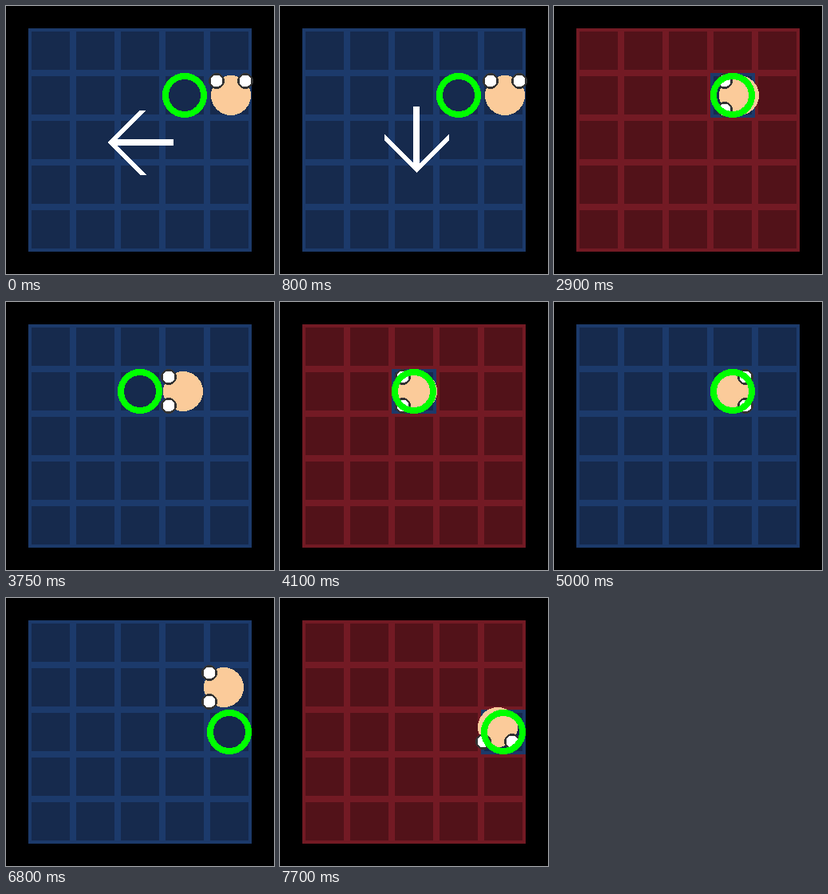
An HTML page for the animation above (8 s loop, 336 px wide and 336 px high).

```html
<!DOCTYPE html>
<html lang="en">
<head>
<meta charset="utf-8">
<title>Grid memory game</title>
<style>
html, body { margin: 0; width: 100%; height: 100%; overflow: hidden; background: #000; }
svg { display: block; width: 336px; height: 336px; shape-rendering: crispEdges; }
.cell { fill: #162a4d; stroke: #1c3a6b; stroke-width: 4; }
.cell.miss { fill: #521219; stroke: #731a24; }
.ring { fill: none; stroke-width: 8; }
.eye { fill: #fff; stroke: #333; stroke-width: 2.5; }
</style>
</head>
<body>
<svg viewBox="0 0 336 336">
  <g id="grid"></g>
  <g id="player">
    <circle r="25" fill="#fbcb9a"/>
    <circle class="eye" cx="18" cy="-18" r="8.75"/>
    <circle class="eye" cx="18" cy="18" r="8.75"/>
  </g>
  <circle id="goal" class="ring" r="24" stroke="#0f0"/>
  <path id="arrow" fill="#fff" d="M127 171l40-40h8l-36 36h71v8h-71l37 37h-8z"/>
  <circle id="stay" class="ring" cx="164" cy="164" r="36" stroke="#fff"/>
</svg>
<script>
const [grid, player, goal, arrow, stay] =
  ['grid', 'player', 'goal', 'arrow', 'stay'].map(id => document.getElementById(id));
const LOOP = 8000, TICK = 50, SPEED = 10, WALL = 283, MID = 168;
const CUE = 200, CUE_ON = 150, ROUND = 1200, CHECK_START = 2900, CHECK = 300;
const DIAGONAL_SHIFT = 18.2;

// Cues as compass steps; "-" means stay.
const cues = 'W W E E S W SW SE NW -'.split(' ');

// Key presses: start time, direction, number of ticks.
const presses = [
  [2250, 'W', 3], [2800, 'W', 2], [3750, 'W', 6], [4800, 'E', 7],
  [5450, 'W', 1], [6000, 'E', 6], [6800, 'W', 1], [7350, 'S', 5]
];

const step = dir => [
  dir.includes('E') - dir.includes('W'),
  dir.includes('S') - dir.includes('N')
];
const degrees = (dx, dy) => Math.atan2(dy, dx) * 180 / Math.PI;
const center = i => 56 + 56 * i;

// Each target lies one cue further than the last.
let col = 4, row = 1;
const targets = cues.map(cue => {
  const [dx, dy] = step(cue);
  return [col += dx, row += dy];
});

for (let i = 0; i < 25; i++) {
  const cell = document.createElementNS('http://www.w3.org/2000/svg', 'rect');
  cell.setAttribute('x', center(i % 5) - 26);
  cell.setAttribute('y', center(Math.floor(i / 5)) - 26);
  cell.setAttribute('width', 52);
  cell.setAttribute('height', 52);
  grid.append(cell);
}

function showCue(t) {
  const cue = t % CUE < CUE_ON ? cues[Math.floor(t / CUE)] : '';
  const [dx, dy] = step(cue || '');
  stay.style.display = cue === '-' ? '' : 'none';
  arrow.style.display = dx || dy ? '' : 'none';
  const shift = dx && dy ? DIAGONAL_SHIFT : 0;
  arrow.setAttribute('transform',
    `translate(${shift} ${shift}) rotate(${degrees(-dx, -dy)} ${MID} ${MID})`);
}

function showPlayer(t) {
  let x = 282, y = 112, facing = 'N';
  for (const [start, dir, ticks] of presses) {
    if (t < start) break;
    const way = SPEED * Math.min(ticks, Math.floor((t - start) / TICK) + 1);
    const [dx, dy] = step(dir);
    x = Math.min(WALL, x + dx * way);
    y += dy * way;
    facing = dir;
  }
  player.setAttribute('transform', `translate(${x} ${y}) rotate(${degrees(...step(facing))})`);
}

function showRound(t) {
  const since = t - CHECK_START;
  const checking = since >= 0 && since % ROUND < CHECK;
  const [col, row] = targets[Math.max(0, Math.floor((since - CHECK) / ROUND) + 1)];
  [...grid.children].forEach((cell, i) => {
    const miss = checking && i !== row * 5 + col;
    cell.setAttribute('class', miss ? 'cell miss' : 'cell');
  });
  goal.setAttribute('cx', center(col));
  goal.setAttribute('cy', center(row));
}

const begin = performance.now();
function run() {
  const t = (performance.now() - begin) % LOOP;
  showRound(t);
  showPlayer(t);
  showCue(t);
  requestAnimationFrame(run);
}
run();
</script>
</body>
</html>
```
